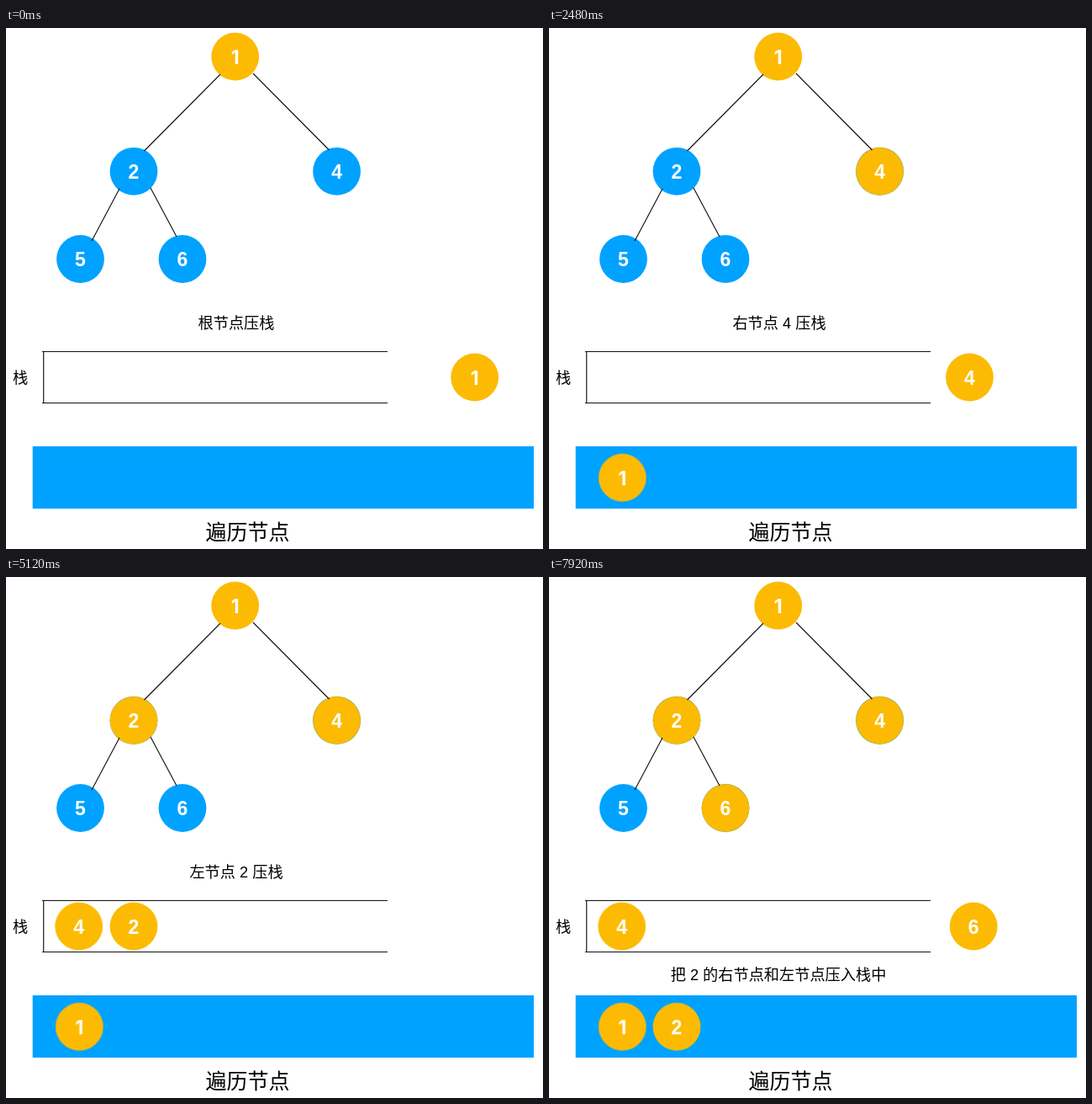
Animation of 639 by 619 pixels, one loop 8000 ms. Source, as an HTML page:

```html
<!DOCTYPE html>
<html lang="zh-CN">
<head>
<meta charset="utf-8">
<title>遍历节点</title>
<style>
html, body { margin: 0; width: 100%; height: 100%; overflow: hidden; background: #fff; }
svg { display: block; width: 639px; height: 619px; }
text { font-family: "Liberation Sans", "Noto Sans CJK SC", "Noto Sans CJK", sans-serif; font-size: 18.2px; text-anchor: middle; }
.big { font-size: 22.8px; }
.title { font-size: 25px; }
.num { font-size: 23px; font-weight: 700; fill: #fff; }
.one { font-family: Inter, Roboto, sans-serif; }
.blue { fill: #00a2ff; }
.gold { fill: #fcbb02; }
.line { fill: none; stroke: #111; stroke-width: 1.15; }

/* hard cuts */
.cut { animation: 8s step-end infinite; }
.root { animation-name: root; }
.popRoot { animation-name: popRoot; }
.right { animation-name: right; }
.left { animation-name: left; }
.popLeft { animation-name: popLeft; }
.push { animation-name: push; }
.show4 { animation-name: show4; }
.show2 { animation-name: show2; }
@keyframes root { 0% { opacity: 1 } 29%, 100% { opacity: 0 } }
@keyframes popRoot { 0% { opacity: 0 } 14.5% { opacity: 1 } 29%, 100% { opacity: 0 } }
@keyframes right { 0% { opacity: 0 } 29% { opacity: 1 } 50%, 100% { opacity: 0 } }
@keyframes left { 0% { opacity: 0 } 50% { opacity: 1 } 70%, 100% { opacity: 0 } }
@keyframes popLeft { 0% { opacity: 0 } 70% { opacity: 1 } 92.5%, 100% { opacity: 0 } }
@keyframes push { 0% { opacity: 0 } 92.5%, 100% { opacity: 1 } }
@keyframes show4 { 0% { opacity: 0 } 29%, 100% { opacity: 1 } }
@keyframes show2 { 0% { opacity: 0 } 50%, 100% { opacity: 1 } }

/* stack tokens */
.move { animation: 8s ease-in-out infinite; }
.move1 { animation-name: move1; }
.move4 { animation-name: move4; }
.move2 { animation-name: move2; }
@keyframes move1 {
  0%, 2.5% { transform: translate(557.7px, 415px) }
  10%, 18.5% { transform: translate(86.7px, 415px) }
  26%, 100% { transform: translate(87.3px, 534.3px) }
}
@keyframes move4 {
  0%, 39.84% { transform: translate(500.5px, 415px) }
  47.34%, 100% { transform: translate(86.7px, 415px) }
}
@keyframes move2 {
  0%, 55.5% { transform: translate(512px, 415px) }
  63%, 75% { transform: translate(152px, 415px) }
  82.5%, 100% { transform: translate(152px, 534.3px) }
}
</style>
</head>
<body>
<svg viewBox="0 0 639 619">
  <defs>
    <circle id="dot" r="28.4"/>
    <text id="n1" class="num one" y="8.6">1</text>
    <text id="n2" class="num" y="8.6">2</text>
    <text id="n4" class="num" y="8.6">4</text>
    <text id="n5" class="num" y="8.6">5</text>
    <text id="n6" class="num" y="8.6">6</text>
  </defs>
  <rect width="639" height="619" fill="#fff"/>

  <g transform="translate(272.7 34)"><use href="#dot" class="gold"/><use href="#n1"/></g>
  <g transform="translate(152 170.3)">
    <use href="#dot" class="blue"/><use href="#dot" class="gold cut show2"/><use href="#n2"/>
  </g>
  <g transform="translate(393.6 170.3)">
    <use href="#dot" class="blue"/><use href="#dot" class="gold cut show4"/><use href="#n4"/>
  </g>
  <g transform="translate(88.5 274.5)"><use href="#dot" class="blue"/><use href="#n5"/></g>
  <g transform="translate(210 274.5)">
    <use href="#dot" class="blue"/><use href="#dot" class="gold cut push"/><use href="#n6"/>
  </g>
  <path class="line" d="M255 55L164.5 146M294 54L384.5 145M135 191L102 253M172 190L203 248"/>

  <text x="17" y="421.5">栈</text>
  <path class="line" d="M43 384.5H454M43 445.5H454M44.7 384V446"/>
  <rect class="blue" x="31.7" y="497" width="596.3" height="74"/>
  <text class="title" x="287.5" y="608">遍历节点</text>

  <g class="move move1"><use href="#dot" class="gold"/><use href="#n1"/></g>
  <g class="cut show4"><g class="move move4"><use href="#dot" class="gold"/><use href="#n4"/></g></g>
  <g class="cut show2"><g class="move move2"><use href="#dot" class="gold"/><use href="#n2"/></g></g>
  <g class="cut push"><g transform="translate(505.2 415)"><use href="#dot" class="gold"/><use href="#n6"/></g></g>

  <text class="cut root" x="274" y="357">根节点压栈</text>
  <text class="cut right" x="274" y="357">右节点 4 压栈</text>
  <text class="cut left" x="274" y="357">左节点 2 压栈</text>
  <text class="big cut popRoot" x="249" y="480">出栈并先压右节点，再压左节点</text>
  <text class="cut popLeft" x="273" y="478.7">弹栈并把 2 的右节点和左节点压入栈中</text>
  <text class="cut push" x="273" y="478.7">把 2 的右节点和左节点压入栈中</text>
</svg>
</body>
</html>
```
